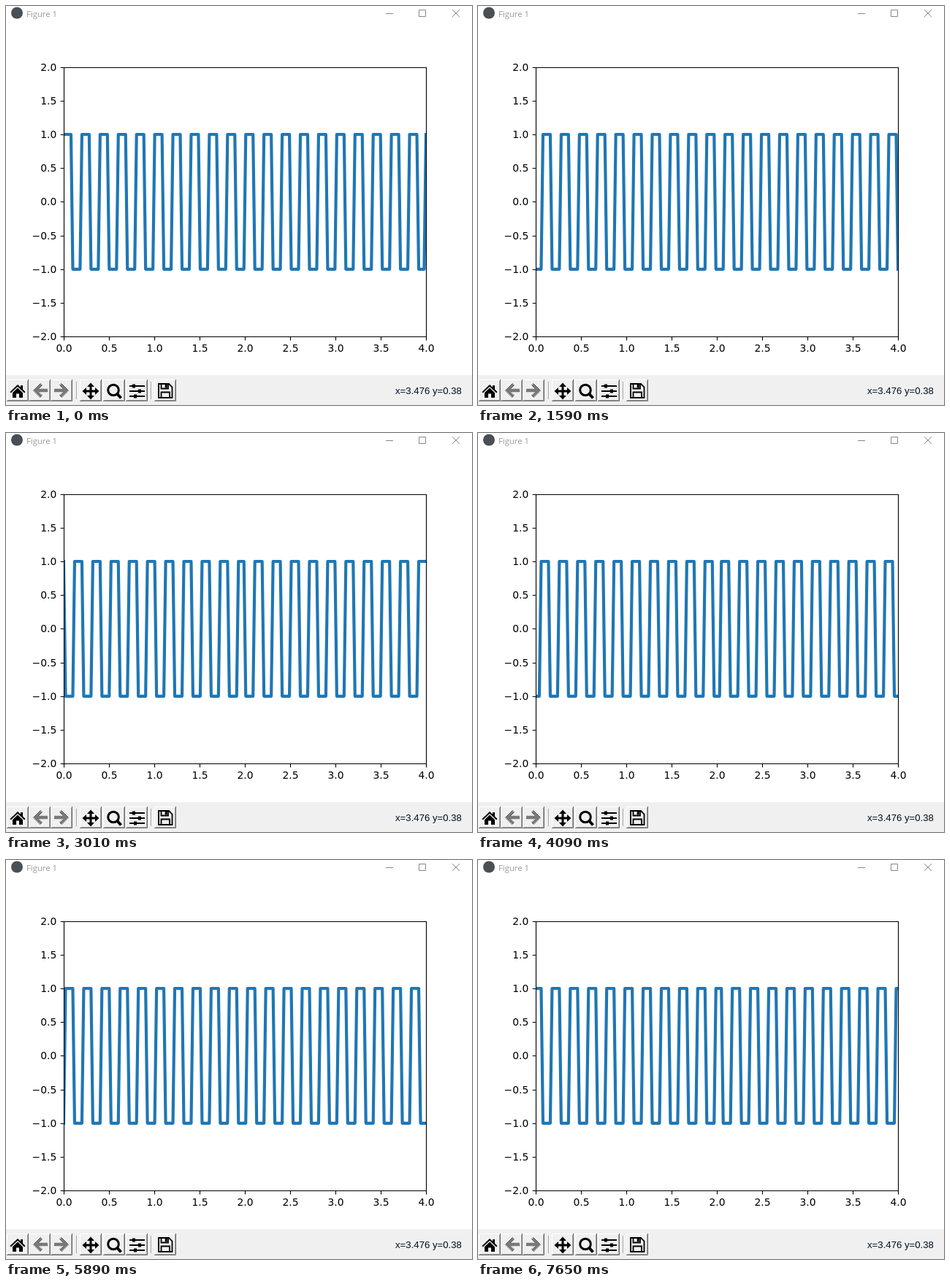
These frames come from a looping animation (638x547 px, 7.71 s). An HTML page:

```html
<!DOCTYPE html>
<html lang="en">
<head>
<meta charset="utf-8">
<title>Figure 1</title>
<style>
  html, body { margin: 0; width: 100%; height: 100%; overflow: hidden; background: #fff; }
  svg { display: block; }
  .axis { font: 13.89px "DejaVu Sans", sans-serif; }
  .title { font: 11.3px "Open Sans", "Noto Sans", sans-serif; fill: #999; }
  .readout { font: 13.2px "Liberation Sans", Arial, sans-serif; fill: #001020; }
  .line { fill: none; stroke: #000; stroke-width: 1.11; }
  .controls { fill: none; stroke: #888; }
  .wave { fill: none; stroke: #1f77b4; stroke-width: 4.17; stroke-linejoin: round; stroke-linecap: square; }
</style>
</head>
<body>
<svg width="638" height="547" viewBox="0 0 638 547">
  <defs>
    <clipPath id="plot"><rect x="79" y="84" width="496" height="369"/></clipPath>
    <pattern id="stipple" width="2" height="2" patternUnits="userSpaceOnUse">
      <path d="M0 0h1v1h-1zM1 1h1v1h-1z" shape-rendering="crispEdges"/>
    </pattern>
    <path id="arrow" d="M-10 0L0 -10L3 -7L-2 -2.2H10V2.2H-2L3 7L0 10Z"/>
    <path id="tip" d="M0 -11.5L5 -6H-5Z"/>
  </defs>

  <circle cx="15" cy="9.5" r="8" fill="#4a4f55"/>
  <text class="title" x="28" y="15">Figure 1</text>
  <path class="controls" d="M520 10.5H530M565.5 5.5h9v9h-9zM611 5L621 15M621 5L611 15"/>

  <path class="wave" id="wave" clip-path="url(#plot)"/>
  <path class="line" d="M79.5 84.5H575.5V453.5H79.5Z"/>
  <g id="ticks"></g>

  <rect y="506" width="638" height="41" fill="#f0f0f0"/>
  <g id="buttons"></g>
  <path d="M96.5 515V539M198.5 515V539" stroke="#a0a0a0"/>
  <path d="M97.5 515V539M199.5 515V539" stroke="#fff"/>

  <g transform="translate(16 528)">
    <path d="M-10.5 1L0 -9L4 -5.2V-8H7V-2.4L10.5 1L9.2 2.4L0 -6.2L-9.2 2.4Z"/>
    <path d="M-7 2.2L0 -4.4L7 2.2V9H2V3.5H-2V9H-7Z"/>
  </g>
  <g fill="url(#stipple)">
    <use href="#arrow" x="47" y="527"/>
    <path d="M86 527L76 517L73 520L78 524.8H66V529.2H78L73 534L76 537Z"/>
  </g>
  <g transform="translate(116 528)">
    <path d="M0 -8V8M-8 0H8" stroke="#000" stroke-width="3"/>
    <use href="#tip"/>
    <use href="#tip" transform="rotate(90)"/>
    <use href="#tip" transform="rotate(180)"/>
    <use href="#tip" transform="rotate(270)"/>
  </g>
  <g fill="none" stroke="#000" stroke-width="3">
    <circle cx="147" cy="526.5" r="7.3"/>
    <path d="M152 531.5L157.5 537.5" stroke-width="4"/>
  </g>
  <path d="M169 521H190M169 528H190M169 535H190" stroke="#000" stroke-width="2"/>
  <path d="M173 518.5h4v5h-4zM181 525.5h4v5h-4zM175 532.5h4v5h-4z"/>
  <g fill="none" stroke="#000" stroke-width="1.8">
    <path d="M209 518H223L227.5 522.5V537H209Z"/>
    <path d="M212.5 518V524.5H222V518M212.5 537V529.5H224V537"/>
    <path d="M219.2 518V523.5" stroke-width="3"/>
  </g>
  <text class="readout" x="533" y="532">x=3.476 y=0.38</text>
</svg>
<script>
  const el = id => document.getElementById(id);

  const label = (x, y, anchor, text) =>
    `<text class="axis" x="${x}" y="${y}" text-anchor="${anchor}">${text}</text>`;

  let ticks = "";
  for (let i = 0; i <= 8; i++) {
    const x = 79 + 62 * i;
    const y = 453.2 - 46.2 * i;
    const row = Math.floor(y + 0.5) + 0.5;
    const value = i / 2 - 2;
    const name = (value < 0 ? "\u2212" : "") + Math.abs(value).toFixed(1);
    ticks += `<path class="line" d="M${x + 0.5} 453.5v4.9M79.5 ${row}h-4.9"/>`
      + label(x + 0.5, 474, "middle", (i / 2).toFixed(1))
      + label(69.3, Math.round(y + 5), "end", name);
  }
  el("ticks").innerHTML = ticks;

  // Raised toolbar buttons
  el("buttons").innerHTML = [1, 31, 61, 101, 133, 164, 203].map(x => `
    <g transform="translate(${x} 512)" fill="none">
      <path d="M0.5 29V0.5H29" stroke="#fff"/>
      <path d="M1.5 28.5H28.5V1.5" stroke="#a0a0a0"/>
      <path d="M0 29.5H29.5V0" stroke="#696969"/>
    </g>`).join("");

  const LOOP = 7710, FRAMES = 115, SAMPLES = 200;

  // Redraws are 60 or 80 ms apart
  const startOf = k => {
    if (k === 0) return 0;
    const m = k - 1;
    return 70 + 20 * Math.max(3 * m, Math.floor(3.365 * m - 0.85));
  };
  const starts = Array.from({ length: FRAMES }, (_, k) => startOf(k));

  // Shift in hundredths: two per redraw, now and then three
  const shiftOf = k => 2 * k + Math.max(0, Math.floor((k - 30) / 9));

  // Sampled square wave with a period of 20 hundredths
  function wavePath(shift) {
    const points = [];
    for (let i = 0; i < SAMPLES; i++) {
      const x = i * 400 / (SAMPLES - 1);
      const phase = (((x - shift) % 20) + 20) % 20;
      points.push(`${(79 + x * 1.24).toFixed(2)} ${phase < 10 ? 176 : 360.8}`);
    }
    return "M" + points.join("L");
  }

  const wave = el("wave");
  const origin = performance.now();
  let shown = -1;

  function draw() {
    const t = (performance.now() - origin) % LOOP;
    let k = FRAMES - 1;
    while (starts[k] > t) k--;
    if (k !== shown) {
      shown = k;
      wave.setAttribute("d", wavePath(shiftOf(k)));
    }
    requestAnimationFrame(draw);
  }
  draw();
</script>
</body>
</html>
```
